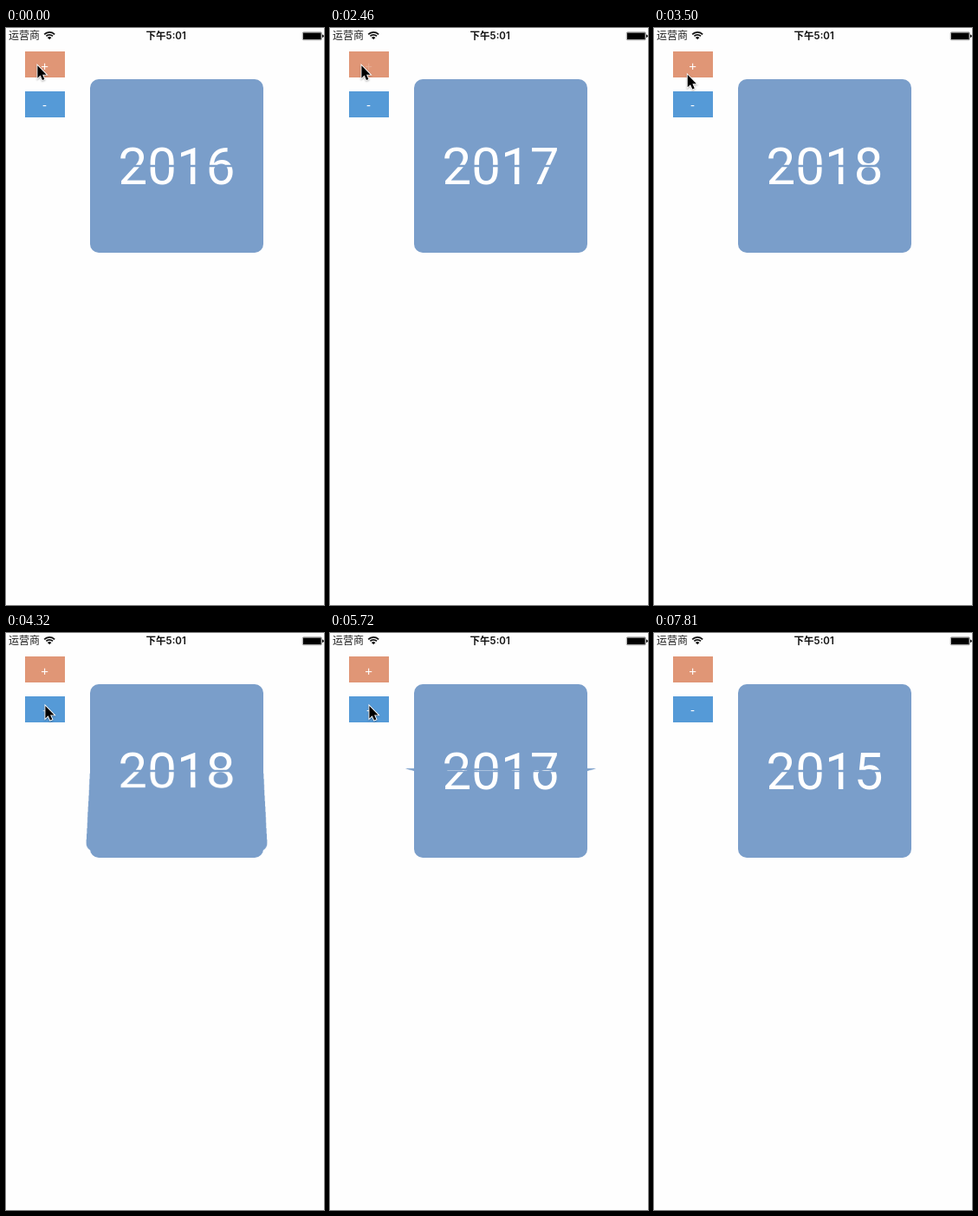
An HTML page with a canvas that plays this animation: 367 by 665 pixels, repeating every 8.51 s.

```html
<!DOCTYPE html>
<html lang="zh">
<head>
<meta charset="utf-8">
<title>Flip counter</title>
<style>
  html, body { margin: 0; width: 100%; height: 100%; overflow: hidden; background: #fefefe; }
  canvas { display: block; }
</style>
</head>
<body>
<canvas id="stage" width="367" height="665"></canvas>
<script>
const W = 367, H = 665, LOOP = 8510;
const ctx = document.getElementById('stage').getContext('2d');
const CARD = { x: 97, mid: 159, w: 200, half: 100, r: 10, color: '#7a9eca' };
const DIGITS = 'Roboto, "Liberation Sans", sans-serif';
const SANS = '"Liberation Sans", Arial, sans-serif';
const CJK = '"Noto Sans CJK SC", "Noto Sans CJK", sans-serif';
const DEPTH = 1000;   // perspective distance
const SS = 3;         // supersampling of the turning leaf

// Each flip: start, end, number of steps, direction, values, phase within a step
const flips = [
  { at: 890,  end: 1560, steps: 11, dir: 1,  from: 2016, to: 2017, phase: 0 },
  { at: 2460, end: 3090, steps: 11, dir: 1,  from: 2017, to: 2018, phase: 0 },
  { at: 4100, end: 4720, steps: 11, dir: -1, from: 2018, to: 2017, phase: 0.23 },
  { at: 5260, end: 5890, steps: 11, dir: -1, from: 2017, to: 2016, phase: 0.23 },
  { at: 6490, end: 7220, steps: 13, dir: -1, from: 2016, to: 2015, phase: 0 }
];
// Leaf angle in degrees per step
const angles = [0, 0, 2, 10, 24, 41, 56, 68, 81.5, 125, 162, 180];

const clamp = (v, lo = 0, hi = 1) => Math.min(hi, Math.max(lo, v));
const smooth = v => v * v * (3 - 2 * v);

function stepOf(f, t) {
  const k = Math.floor((t - f.at) / (f.end - f.at) * f.steps + 0.3);
  return clamp(k, 0, f.steps);
}

function angleAt(k, phase) {
  if (k >= 11) return 180;
  return angles[k] + (angles[k + 1] - angles[k]) * phase;
}

function text(c, str, x, y, font, color, align = 'center') {
  c.font = font;
  c.fillStyle = color;
  c.textAlign = align;
  c.textBaseline = 'alphabetic';
  c.fillText(str, x, y);
}

// One half of a card, drawn in its own box of 200 by 100
function paintHalf(c, value, top) {
  c.save();
  c.beginPath();
  c.roundRect(0, 0, CARD.w, CARD.half, top ? [CARD.r, CARD.r, 0, 0] : [0, 0, CARD.r, CARD.r]);
  c.fillStyle = CARD.color;
  c.fill();
  c.beginPath();
  c.rect(0, top ? 0 : 1.3, CARD.w, CARD.half - 1.3);
  c.clip();
  text(c, value, CARD.w / 2, top ? 121.2 : 21.2, '60px ' + DIGITS, '#fff');
  c.restore();
}

function drawHalf(value, top) {
  ctx.save();
  ctx.translate(CARD.x, top ? CARD.mid - CARD.half : CARD.mid);
  paintHalf(ctx, value, top);
  ctx.restore();
}

function makeCanvas(w, h) {
  const c = document.createElement('canvas');
  c.width = w;
  c.height = h;
  return c;
}

const faces = {};
function face(value, top) {
  const key = value + (top ? 't' : 'b');
  if (!faces[key]) {
    const c = makeCanvas(CARD.w * SS, CARD.half * SS);
    const g = c.getContext('2d');
    g.scale(SS, SS);
    paintHalf(g, value, top);
    faces[key] = c;
  }
  return faces[key];
}

const LW = 240, LH = 220;
const leaf = makeCanvas(LW * SS, LH * SS);
const leafCtx = leaf.getContext('2d');

// Projects a half card turned about the middle line, row by row
function drawLeaf(value, top, tilt) {
  const cos = Math.cos(tilt), sin = Math.sin(tilt);
  const img = face(value, top);
  const reach = CARD.half * cos / (1 - CARD.half * sin / DEPTH);
  const rows = Math.max(1, Math.round(reach * SS));
  const dist = y => y / (cos + y * sin / DEPTH);
  leafCtx.clearRect(0, 0, leaf.width, leaf.height);
  for (let i = 0; i < rows; i++) {
    const r0 = Math.min(CARD.half, dist(i / SS));
    const r1 = Math.min(CARD.half, dist((i + 1) / SS));
    const dr = Math.max(0.05, r1 - r0);
    const wide = CARD.w / (1 - (r0 + r1) / 2 * sin / DEPTH) * SS;
    const sy = clamp(top ? CARD.half - r0 - dr : r0, 0, CARD.half - dr);
    const dy = LH / 2 * SS + (top ? -1 - i : i);
    leafCtx.drawImage(img, 0, sy * SS, img.width, dr * SS,
      (LW * SS - wide) / 2, dy, wide, 1);
  }
  ctx.imageSmoothingQuality = 'high';
  ctx.drawImage(leaf, CARD.x + CARD.w / 2 - LW / 2, CARD.mid - LH / 2, LW, LH);
}

function drawCard(f, t) {
  const deg = f ? angleAt(stepOf(f, t), f.phase) : 0;
  const plus = f && f.dir > 0;
  if (!f || deg <= 0 || deg >= 180) {
    const value = !f ? 2016 : deg >= 180 ? f.to : f.from;
    drawHalf(value, true);
    drawHalf(value, false);
    return;
  }
  drawHalf(plus ? f.to : f.from, true);
  drawHalf(plus ? f.from : f.to, false);
  const back = deg > 90;
  const tilt = (back ? 180 - deg : deg) * Math.PI / 180;
  drawLeaf(back ? f.to : f.from, plus !== back, tilt);
}

function drawButton(y, color, label, base, alpha) {
  ctx.fillStyle = color;
  ctx.fillRect(22, y, 46, 30);
  ctx.globalAlpha = alpha;
  text(ctx, label, 44.6, base, '15px ' + SANS, '#fff');
  ctx.globalAlpha = 1;
}

function drawButtons(f, t) {
  let alpha = 1;
  if (f) alpha = 0.2 + 0.8 * clamp((stepOf(f, t) - 1) / 6);
  drawButton(27, '#e09676', '+', 48.6, f && f.dir > 0 ? alpha : 1);
  drawButton(73, '#559ad7', '-', 93.6, f && f.dir < 0 ? alpha : 1);
}

function drawStatus() {
  text(ctx, '运营商', 3, 13.4, '12px ' + CJK, '#222', 'left');
  text(ctx, '下午5:01', 184.7, 13.4, '600 11.5px Inter, ' + CJK, '#111');

  // wifi
  ctx.strokeStyle = ctx.fillStyle = '#111';
  ctx.lineWidth = 1.7;
  for (const r of [8.2, 5.2]) {
    ctx.beginPath();
    ctx.arc(50.2, 13, r, -Math.PI * 0.76, -Math.PI * 0.24);
    ctx.stroke();
  }
  ctx.beginPath();
  ctx.moveTo(50.2, 13.3);
  ctx.arc(50.2, 13.3, 3.2, -Math.PI * 0.76, -Math.PI * 0.24);
  ctx.fill();

  // battery
  ctx.strokeStyle = '#555';
  ctx.lineWidth = 0.6;
  ctx.beginPath();
  ctx.roundRect(342.3, 4.8, 22, 9, 1.2);
  ctx.stroke();
  ctx.fillStyle = '#000';
  ctx.fillRect(343, 5.5, 20.6, 7.6);
  ctx.beginPath();
  ctx.arc(365, 9.3, 1.7, -Math.PI / 2, Math.PI / 2);
  ctx.fill();
}

const arrow = [[0, 0], [0, 14.4], [3.3, 11.3], [5.6, 16.6], [8, 15.6], [5.7, 10.4], [10.2, 10.4]];

function drawCursor(t) {
  let x, y;
  const last = flips[4], k = t >= last.at ? stepOf(last, t) : 0;
  if (k >= 13) return;
  if (k === 12) {
    x = 342;
    y = 575.5;
  } else {
    const n = clamp(Math.floor((t - 3390) / 70 + 1), 0, 6);
    const p = smooth(n / 6);
    x = 36.4 + 9 * p;
    y = 43.3 + 40.7 * p;
  }
  ctx.save();
  ctx.translate(x, y);
  ctx.beginPath();
  arrow.forEach(([a, b]) => ctx.lineTo(a, b));
  ctx.closePath();
  ctx.lineJoin = 'miter';
  ctx.lineWidth = 1.8;
  ctx.strokeStyle = '#fff';
  ctx.shadowColor = 'rgba(0,0,0,.3)';
  ctx.shadowBlur = 2;
  ctx.shadowOffsetY = 1;
  ctx.stroke();
  ctx.shadowColor = 'transparent';
  ctx.fillStyle = '#000';
  ctx.fill();
  ctx.restore();
}

function draw(t) {
  const f = flips.filter(v => t >= v.at).pop();
  ctx.fillStyle = '#fefefe';
  ctx.fillRect(0, 0, W, H);
  drawStatus();
  drawButtons(f, t);
  drawCard(f, t);
  drawCursor(t);
}

const begin = performance.now();
function tick() {
  draw((performance.now() - begin) % LOOP);
  requestAnimationFrame(tick);
}
tick();
</script>
</body>
</html>
```
